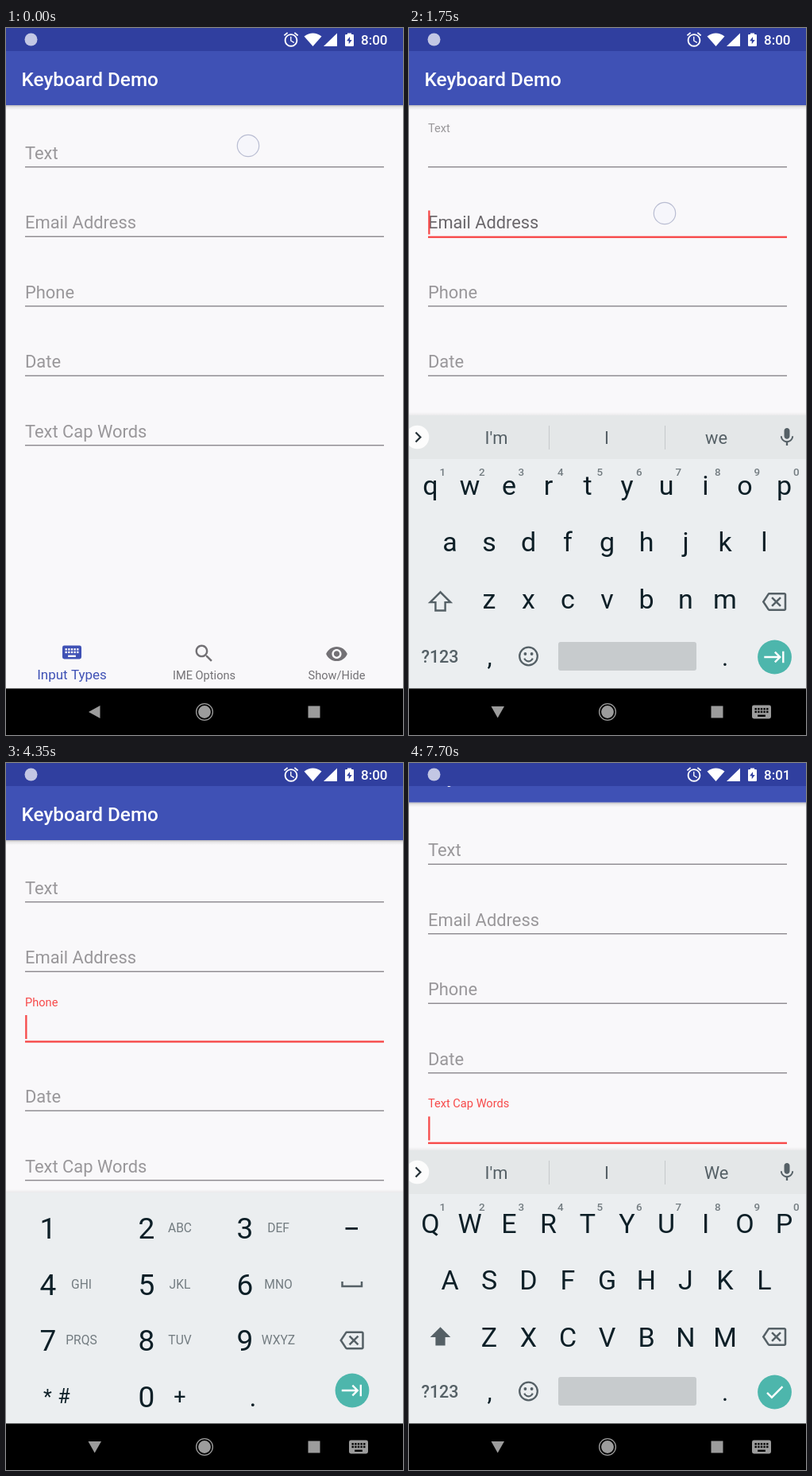
Animation, 500 px wide and 889 px high, one loop 8 s. Source, as an HTML page with a canvas:

```html
<!DOCTYPE html>
<html lang="en">
<head>
<meta charset="utf-8">
<title>Keyboard Demo</title>
<style>
html, body { margin: 0; width: 100%; height: 100%; overflow: hidden; background: #000; }
canvas { display: block; width: 500px; height: 889px; }
</style>
</head>
<body>
<canvas id="stage"></canvas>
<script>
const W = 500, H = 889, LOOP = 8000;
const canvas = document.getElementById('stage');
const ratio = window.devicePixelRatio || 1;
canvas.width = W * ratio;
canvas.height = H * ratio;
const ctx = canvas.getContext('2d');

const PAGE = '#f9f8fa', INDIGO = '#3f51b5', INDIGO_DARK = '#303f9f';
const INK = '#0d1f27', SLATE = '#556066', TEAL = '#4db6ac', BOARD = '#ebeef0';
const RED = [247, 74, 74], HINT = [153, 151, 154], HINT_DARK = [105, 103, 107];

const FIELDS = ['Text', 'Email Address', 'Phone', 'Date', 'Text Cap Words'];
const PITCH = 87.5;
const FOCUS = [50, 1740, 3345, 4900, 6578];
const SWITCH_DELAY = 50;
const TAPS = [
  { x: 305, y: 148, from: -150, to: 60 },
  { x: 322, y: 233, from: 1600, to: 1770 },
  { x: 314, y: 323, from: 3260, to: 3390 },
  { x: 304, y: 411, from: 4850, to: 4950 },
  { x: 288, y: 501, from: 6450, to: 6670 }
];

// Material icons on a 24 unit grid
const ICONS = {
  eye: 'M12 4.5C7 4.5 2.73 7.61 1 12c1.73 4.39 6 7.5 11 7.5s9.27-3.11 11-7.5c-1.73-4.39-6-7.5-11-7.5zM12 17c-2.76 0-5-2.24-5-5s2.24-5 5-5 5 2.24 5 5-2.24 5-5 5zm0-8c-1.66 0-3 1.34-3 3s1.34 3 3 3 3-1.34 3-3-1.34-3-3-3z',
  search: 'M15.5 14h-.79l-.28-.27C15.41 12.59 16 11.11 16 9.5 16 5.91 13.09 3 9.5 3S3 5.91 3 9.5 5.91 16 9.5 16c1.61 0 3.09-.59 4.23-1.57l.27.28v.79l5 4.99L20.49 19l-4.99-5zm-6 0C7.01 14 5 11.99 5 9.5S7.01 5 9.5 5 14 7.01 14 9.5 11.99 14 9.5 14z',
  mic: 'M12 14c1.66 0 3-1.34 3-3V5c0-1.66-1.34-3-3-3S9 3.34 9 5v6c0 1.66 1.34 3 3 3zm5.3-3c0 3-2.54 5.1-5.3 5.1S6.7 14 6.7 11H5c0 3.41 2.72 6.23 6 6.72V21h2v-3.28c3.28-.48 6-3.3 6-6.72h-1.7z',
  erase: 'M22 3H7c-.69 0-1.23.35-1.59.88L0 12l5.41 8.11c.36.53.9.89 1.59.89h15c1.1 0 2-.9 2-2V5c0-1.1-.9-2-2-2zm0 16H7.07L2.4 12l4.66-7H22v14zm-11.59-2L14 13.41 17.59 17 19 15.59 15.41 12 19 8.41 17.59 7 14 10.59 10.41 7 9 8.41 12.59 12 9 15.59z',
  next: 'M11.59 7.41L15.17 11H1v2h14.17l-3.59 3.59L13 18l6-6-6-6zM20 6v12h2V6z',
  check: 'M9 16.17L4.83 12l-1.42 1.41L9 19 21 7l-1.41-1.41z',
  alarm: 'M22 5.72l-4.6-3.86-1.29 1.53 4.6 3.86zM7.88 3.39L6.6 1.86 2 5.71l1.29 1.53zM12.5 8H11v6l4.75 2.85.75-1.23-4-2.37zM12 4c-4.97 0-9 4.03-9 9s4.02 9 9 9c4.97 0 9-4.03 9-9s-4.03-9-9-9zm0 16c-3.87 0-7-3.13-7-7s3.13-7 7-7 7 3.13 7 7-3.13 7-7 7z',
  shift: 'M12 2L1.5 12.5H7V21h10v-8.500h5.500z',
  bolt: 'M13 6L7 14h4v6l6-8h-4z',
  chevron: 'M8.600 16.600L13.200 12 8.600 7.400 10 6l6 6-6 6z'
};
for (const key in ICONS) ICONS[key] = new Path2D(ICONS[key]);

const clamp = v => Math.max(0, Math.min(1, v));
const lerp = (a, b, k) => a + (b - a) * k;
const mix = (a, b, k) => `rgb(${a.map((v, i) => Math.round(lerp(v, b[i], k)))})`;

// Cubic bezier (.4, 0, .2, 1)
function ease(x) {
  x = clamp(x);
  let lo = 0, hi = 1;
  for (let i = 0; i < 20; i++) {
    const s = (lo + hi) / 2, r = 1 - s;
    if (1.2 * r * r * s + 0.6 * r * s * s + s * s * s < x) lo = s; else hi = s;
  }
  return 3 * (1 - lo) * lo * lo + lo ** 3;
}

function rect(x, y, w, h, color) {
  ctx.fillStyle = color;
  ctx.fillRect(x, y, w, h);
}

function round(x, y, w, h, r, color) {
  ctx.fillStyle = color;
  ctx.beginPath();
  ctx.roundRect(x, y, w, h, r);
  ctx.fill();
}

function disc(x, y, r, color) {
  ctx.fillStyle = color;
  ctx.beginPath();
  ctx.arc(x, y, r, 0, Math.PI * 2);
  ctx.fill();
}

function ring(x, y, r, width, color, from = 0, to = Math.PI * 2) {
  ctx.strokeStyle = color;
  ctx.lineWidth = width;
  ctx.beginPath();
  ctx.arc(x, y, r, from, to);
  ctx.stroke();
}

function shape(points, color) {
  ctx.fillStyle = color;
  ctx.beginPath();
  points.forEach(p => ctx.lineTo(p[0], p[1]));
  ctx.fill();
}

function text(str, x, y, size, color, align = 'center', weight = 400) {
  ctx.font = `${weight} ${size}px Roboto, sans-serif`;
  ctx.fillStyle = color;
  ctx.textAlign = align;
  ctx.fillText(str, x, y);
}

function icon(name, x, y, scale, color, outline) {
  ctx.save();
  ctx.translate(x, y);
  ctx.scale(scale, scale);
  ctx.translate(-12, -12);
  if (outline) {
    ctx.strokeStyle = color;
    ctx.lineWidth = 2;
    ctx.stroke(ICONS[name]);
  } else {
    ctx.fillStyle = color;
    ctx.fill(ICONS[name], 'evenodd');
  }
  ctx.restore();
}

function keyboardIcon(x, y, color, keys) {
  round(x - 12, y - 8.5, 24, 17, 2.4, color);
  for (let r = 0; r < 2; r++)
    for (let c = 0; c < 5; c++)
      rect(x - 8.5 + c * 3.65, y - 4.9 + r * 3.65, 2.4, 2.4, keys);
  rect(x - 4.9, y + 3.6, 9.8, 2.4, keys);
}

function statusBar(t) {
  rect(0, 0, W, 29, INDIGO_DARK);
  disc(31.5, 14.5, 8, '#c3c7e4');
  icon('alarm', 359, 14.5, 0.92, '#fff');
  ctx.fillStyle = '#fff';
  ctx.beginPath();
  ctx.moveTo(386.5, 23);
  ctx.lineTo(375.5, 10.5);
  ctx.quadraticCurveTo(386.5, 2.500, 397.5, 10.5);
  ctx.fill();
  shape([[400, 23], [417, 23], [417, 6.5]], '#fff');
  rect(430, 6.5, 5, 3, '#fff');
  round(427, 8, 11, 15, 1.2, '#fff');
  icon('bolt', 432.4, 15, 0.66, INDIGO_DARK);
  text(t < 7700 ? '8:00' : '8:01', 480.5, 21, 17, '#fff', 'right', 500);
}

function systemNav(open) {
  const gray = '#9c9c9c';
  rect(0, 830.5, W, 59, '#000');
  shape(open ? [[103.5, 853], [120, 853], [111.7, 867.5]]
             : [[104, 860], [118.5, 852], [118.5, 868]], gray);
  disc(250, 860, 7.9, gray);
  ring(250, 860, 10.4, 1.3, gray);
  rect(380.5, 852.5, 15, 15, gray);
  if (open) keyboardIcon(444, 860, gray, '#000');
}

function field(i, t) {
  const next = i < 4 ? FOCUS[i + 1] : LOOP + 1;
  const focused = t >= FOCUS[i] && t < next;
  const level = focused ? ease((t - FOCUS[i]) / 200)
    : t >= next ? 1 - ease((t - next) / 200) : 0;
  const top = i * PITCH;
  const size = lerp(21.9, 14.6, 1 - (1 - level) ** 2);
  const base = lerp(164.5, 130.6, level * level) + top;
  text(FIELDS[i], 24, base, size, focused ? mix(HINT_DARK, RED, level) : mix(HINT, HINT, 0), 'left');
  if (focused) {
    rect(24, 174.2 + top, 452, 2.4, mix(RED, RED, 0));
    if (Math.floor((t - FOCUS[i]) / 500) % 2 === 0)
      rect(24.2, 142 + top, 2.3, 30, mix(RED, RED, 0));
  } else {
    rect(24, 174.1 + top, 452, 1.3, '#838085');
  }
}

function page(t) {
  rect(0, 0, W, H, PAGE);
  ctx.save();
  ctx.translate(0, -47.5 * ease((t - 6690) / 230));
  FIELDS.forEach((_, i) => field(i, t));
  const shade = ctx.createLinearGradient(0, 97, 0, 103);
  shade.addColorStop(0, 'rgba(0,0,0,.26)');
  shade.addColorStop(0.4, 'rgba(0,0,0,.08)');
  shade.addColorStop(1, 'rgba(0,0,0,0)');
  rect(0, 97, W, 6, shade);
  rect(0, 0, W, 97, INDIGO);
  text('Keyboard Demo', 19.5, 72.7, 24.3, '#fff', 'left', 500);
  ctx.restore();
}

function tabs() {
  keyboardIcon(83, 785, INDIGO, PAGE);
  text('Input Types', 83, 819, 17, INDIGO);
  icon('search', 249.5, 786.5, 1.215, '#737175');
  text('IME Options', 249.5, 819, 14.6, '#737175');
  icon('eye', 416.5, 787, 1.215, '#737175');
  text('Show/Hide', 416.5, 819, 14.6, '#737175');
}

function panel(top) {
  const shade = ctx.createLinearGradient(0, top - 4, 0, top);
  shade.addColorStop(0, 'rgba(0,0,0,0)');
  shade.addColorStop(1, 'rgba(0,0,0,.06)');
  rect(0, top - 4, W, 4, shade);
  rect(0, top, W, H - top, BOARD);
}

function suggestions(caps) {
  rect(0, 487, W, 55, '#e4e7e8');
  disc(10.5, 514.5, 14.8, '#fcfcfc');
  icon('chevron', 11.5, 514.5, 1.12, '#263238');
  text("I'm", 110, 523, 21.9, SLATE);
  text('I', 249, 523, 21.9, SLATE);
  text(caps ? 'We' : 'we', 387, 523, 21.9, SLATE);
  rect(176, 500, 1, 30, '#c5c9cb');
  rect(322, 500, 1, 30, '#c5c9cb');
  icon('mic', 476, 514.5, 1.16, SLATE);
}

function action(x, y, name) {
  disc(x, y, 21.4, TEAL);
  icon(name, x, y, 1.2, '#fff');
}

function letters({ caps, bar, email }) {
  panel(bar ? 487 : 540);
  if (bar) suggestions(caps);
  const rows = [['qwertyuiop', 27, 587], ['asdfghjkl', 51.5, 658], ['zxcvbnm', 101, 730]];
  for (const [row, x, y] of rows)
    [...row].forEach((ch, i) =>
      text(caps ? ch.toUpperCase() : ch, x + i * 49.5, y + (caps ? 3.5 : 0), 34, INK));
  for (let i = 0; i < 10; i++)
    text((i + 1) % 10, 42.3 + i * 49.5, 563.3, 13.4, '#737c81', 'center', 500);
  icon('shift', 39.5, 721.5, 1.22, SLATE, !caps);
  icon('erase', 460, 721.5, 1.27, SLATE);
  text('?123', 39, 797.5, 21.5, SLATE, 'center', 500);
  if (email) text('@', 101, 800, 27, INK);
  else text(',', 101.5, 801, 31, INK);
  ring(150.5, 790, 11.3, 2.3, SLATE);
  disc(146.4, 787, 1.9, SLATE);
  disc(154.6, 787, 1.9, SLATE);
  ring(150.5, 790.8, 5.6, 2.2, SLATE, 0.35, Math.PI - 0.35);
  round(188, 772, 174, 36, 3, '#c7cbcd');
  text('.', 398, 802, 31, INK);
  action(460.5, 791, caps ? 'check' : 'next');
}

function numbers(date) {
  panel(540);
  const hints = ['', 'ABC', 'DEF', 'GHI', 'JKL', 'MNO', 'PRQS', 'TUV', 'WXYZ'];
  hints.forEach((hint, i) => {
    const x = 53 + (i % 3) * 124, y = 598 + Math.floor(i / 3) * 70.5;
    text(i + 1, x, y, 37, INK);
    if (!date) text(hint, x + 42, y - 7.7, 15.6, '#737c81');
  });
  text('0', 177, 809.5, 37, INK);
  text('.', 311, 809, 34, INK);
  if (date) {
    text('/', 53, 807, 30, INK);
  } else {
    text('*', 52.5, 806, 25, INK);
    text('#', 73, 805, 25, INK);
    text('+', 219, 805.5, 27, INK);
  }
  rect(427.5, 584, 15.5, 2.8, INK);
  ctx.strokeStyle = SLATE;
  ctx.lineWidth = 2.5;
  ctx.beginPath();
  ctx.moveTo(423.5, 652);
  ctx.lineTo(423.5, 658);
  ctx.lineTo(448, 658);
  ctx.lineTo(448, 652);
  ctx.stroke();
  icon('erase', 435.5, 726, 1.27, SLATE);
  action(436, 789, 'next');
}

function keyboard(t) {
  const rise = clamp((t - 90) / 250);
  if (!rise) return;
  const k = 1 - (1 - rise) ** 3;
  ctx.save();
  ctx.globalAlpha = k;
  ctx.translate(0, (1 - k) * 110);
  const since = i => t >= FOCUS[i] + SWITCH_DELAY;
  if (since(4)) letters({ caps: true, bar: true });
  else if (since(3)) numbers(true);
  else if (since(2)) numbers(false);
  else if (since(1)) letters({ email: true });
  else letters({ bar: true });
  ctx.restore();
}

function tap({ x, y, from, to }, t) {
  const alpha = Math.min(clamp((t - from) / 60), 1 - clamp((t - to) / 90));
  if (alpha <= 0) return;
  ctx.save();
  ctx.globalAlpha = alpha;
  disc(x, y, 13.5, 'rgba(243,243,251,.5)');
  ring(x, y, 13.7, 1.2, '#b9bdd2');
  ctx.restore();
}

function draw(t) {
  ctx.setTransform(ratio, 0, 0, ratio, 0, 0);
  page(t);
  tabs();
  keyboard(t);
  statusBar(t);
  systemNav(t >= 100);
  TAPS.forEach(p => tap(p, t));
}

const start = performance.now();
function tick() {
  draw((performance.now() - start) % LOOP);
  requestAnimationFrame(tick);
}
tick();
</script>
</body>
</html>
```
